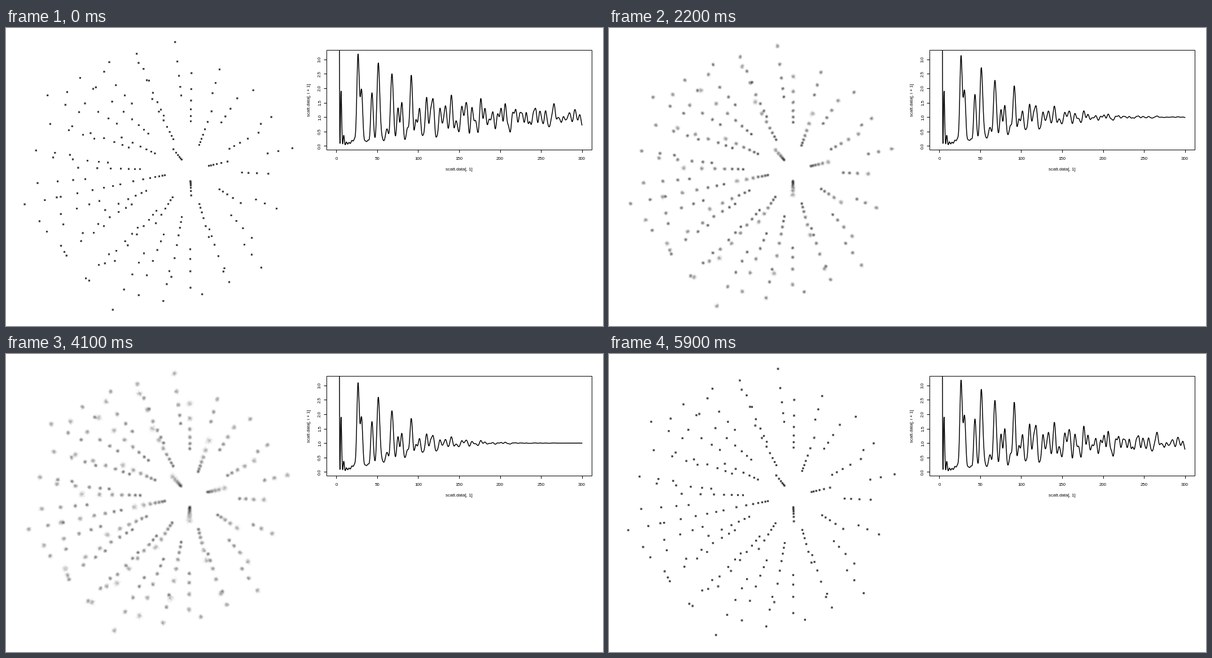
Animation, 1058 px wide and 529 px high, one loop 6.2 s. Source, as a matplotlib script:

```python
import numpy as np
import matplotlib.pyplot as plt
from matplotlib.animation import FuncAnimation
from matplotlib.patches import Rectangle

W, H, DPI = 1058, 529, 100
PX = 72 / DPI                      # one pixel in points
STATES, COPIES = 9, 200
D_NN = 0.2884                      # nearest-neighbour distance, nm
FOCAL, DIST = 492, 7.68            # camera, in nearest-neighbour units

plt.rcParams["font.family"] = "Liberation Sans"
plt.rcParams["font.size"] = 7.92 * PX


def unit(*v):
    return np.array(v) / np.linalg.norm(v)


def fcc_ball(r2max):
    """Spherical fcc cluster, axes along [1-10], [001] and [110]."""
    g = np.arange(-8, 9)
    ijk = np.stack(np.meshgrid(g, g, g), -1).reshape(-1, 3)
    same = (ijk % 2 == ijk[:, :1] % 2).all(1)
    p = ijk[same] * [0.5, np.sqrt(0.5), 0.5]
    return p[(p ** 2).sum(1) < r2max + 0.01]


def debye(p, q):
    """Structure factor of the undisturbed cluster."""
    r2 = ((p[:, None] - p[None]) ** 2).sum(-1)
    shell, count = np.unique(np.rint(r2).astype(int), return_counts=True)
    r = np.sqrt(shell) * D_NN
    return np.sinc(np.outer(q, r) / np.pi) @ count / len(p)


atoms = fcc_ball(12)
e3 = unit(61.5, -11.9, FOCAL)
e1 = unit(0.958, 0.231, -0.1142)
e2 = unit(*np.cross(e1, e3))
cam_atoms = atoms @ np.array([e1, e2, e3])

# Grey level after n faint layers, with 8-bit rounding
shade = [255.0]
for _ in range(400):
    shade.append(shade[-1] - np.floor(shade[-1] * 2 / 255 + 0.5 - 1e-9))
shade = np.array(shade)


def cloud(k):
    """Many thermal snapshots overlaid as faint 3x3 px points."""
    rng = np.random.default_rng(k)
    sigma = 0.001 * (k + 1) / D_NN
    p = cam_atoms + rng.normal(0, sigma, (COPIES,) + cam_atoms.shape)
    depth = DIST * (1 + 0.0044 * k) + p[..., 2]
    xy = H / 2 + FOCAL * p[..., :2] / depth[..., None]
    col, row = np.floor(xy).astype(int).reshape(-1, 2).T
    hits = np.zeros((H, H), int)
    for dy in (-1, 0, 1):
        for dx in (-1, 0, 1):
            np.add.at(hits, (row + dy, col + dx), 1)
    return shade[np.minimum(hits, len(shade) - 1)]


q = np.linspace(0, 300, 1501)
s0 = debye(atoms, q)
curves = [1 + (s0 - 1) * np.exp(-(0.001 * (k + 1) * q) ** 2)
          for k in range(STATES)]
clouds = [cloud(k) for k in range(STATES)]

fig = plt.figure(figsize=(W / DPI, H / DPI), dpi=DPI, facecolor="white")
ax = fig.add_axes([0, 0, 1, 1])
ax.axis("off")

img = ax.imshow(clouds[0], cmap="gray", vmin=0, vmax=255,
                extent=(0, H, H, 0), interpolation="nearest", aspect="auto")
ax.set_xlim(0, W)
ax.set_ylim(H, 0)

# Plot panel, margins counted in text lines
LINE = 9.504
LEFT, RIGHT = H + 4.1 * LINE, W - 2.1 * LINE
TOP, BOTTOM = 4.1 * LINE, H / 2 - 5.1 * LINE


def to_x(v):
    return LEFT + (v + 12) / 324 * (RIGHT - LEFT)


def to_y(v):
    return BOTTOM - (v + 0.128) / 3.456 * (BOTTOM - TOP)


def stroke(x, y):
    ax.plot(x, y, color="black", lw=PX, solid_capstyle="butt")


def label(x, y, s, rot=0):
    ax.text(x, y, s, rotation=rot, rotation_mode="anchor",
            ha="center", va="baseline", color="black")


box = Rectangle((LEFT, TOP), RIGHT - LEFT, BOTTOM - TOP,
                fill=False, ec="black", lw=PX, zorder=3)
ax.add_patch(box)
line, = ax.plot(to_x(q), to_y(curves[0]), color="black", lw=1.5 * PX,
                solid_joinstyle="round")
line.set_clip_path(box)

for v in range(0, 301, 50):
    stroke([to_x(v)] * 2, [BOTTOM, BOTTOM + LINE / 2])
    label(to_x(v), 234, str(v))
for v in np.arange(0, 3.1, 0.5):
    stroke([LEFT - LINE / 2, LEFT], [to_y(v)] * 2)
    label(558, to_y(v), f"{v:.1f}", 90)
label((LEFT + RIGHT) / 2, 253, "scatt.data[, 1]")
label(539, (TOP + BOTTOM) / 2, "scatt.data[, i + 1]", 90)


def update(n):
    # 1 s rest, 0.3 s steps up, 1 s rest, 0.3 s steps down
    k = max(0, min(STATES - 1, 1 + (n - 10) // 3, 7 - (n - 41) // 3))
    img.set_data(clouds[k])
    line.set_ydata(to_y(curves[k]))
    return img, line


anim = FuncAnimation(fig, update, frames=62, interval=100,
                     repeat=True, repeat_delay=0)
plt.show()
```
